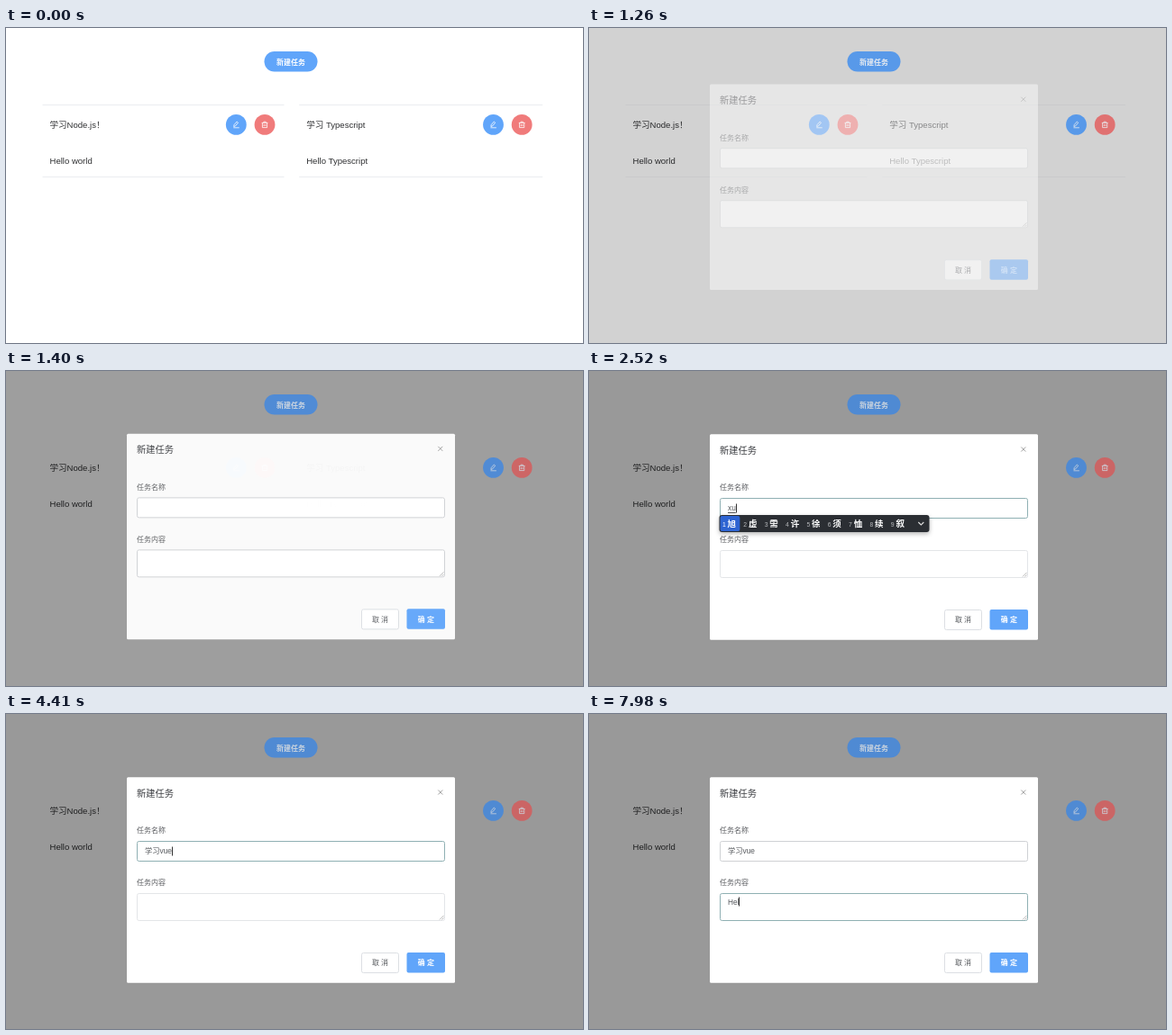
An HTML page with a canvas for the animation above (8000 ms loop, 640 by 350 pixels).

```html
<!DOCTYPE html>
<html lang="zh-CN">
<head>
<meta charset="utf-8">
<title>新建任务</title>
<style>
html, body { margin: 0; width: 100%; height: 100%; overflow: hidden; background: #fff; }
canvas { display: block; width: 640px; height: 350px; }
</style>
</head>
<body>
<canvas id="stage"></canvas>
<script>
const W = 640, H = 350, LOOP = 8000, STEP = 70;
const FONT = '"Liberation Sans", "Noto Sans CJK SC", "Noto Sans CJK", sans-serif';
const OPEN_AT = 1180, OPEN_TIME = 300;
const NAME_FOCUS = 1960, BODY_FOCUS = 5600;

const canvas = document.getElementById('stage');
const ctx = canvas.getContext('2d');
const ratio = window.devicePixelRatio || 1;
canvas.width = W * ratio;
canvas.height = H * ratio;

// Typed states: [start, text, composing, candidates]
const nameSteps = [
  [0, ''],
  [2380, 'x', true, '下 想 像 新 小 写 向 系 些'],
  [2450, 'xu', true, '旭 虚 需 许 徐 须 恤 续 叙'],
  [2660, 'xue', true, '学 雪 血 穴 靴 削 谑 踅 鳕'],
  [2940, 'xuex', true, '学习 学校 学些 学下 血型 雪橇'],
  [3080, 'xuexi', true, '学习 学系 血洗 血吸 雪西 学戏'],
  [3290, '学习'],
  [3990, '学习v'],
  [4130, '学习vu'],
  [4340, '学习vue']
];
const bodySteps = [[0, ''], [7280, 'H'], [7840, 'He'], [7910, 'Hel']];
const nameCaretOff = [[4830, 5320]];
const bodyCaretOff = [[6090, 6580], [7000, 7280], [7630, 7840]];

const at = (steps, t) => steps.filter(s => s[0] <= t).pop();
const inside = (spans, t) => spans.some(([a, b]) => t >= a && t < b);
const mix = (a, b, k) => 'rgb(' + a.map((v, i) => Math.round(v + (b[i] - v) * k)).join(',') + ')';

// CSS "ease" curve
function ease(x) {
  if (x <= 0) return 0;
  if (x >= 1) return 1;
  const curve = (u, a, b) => 3 * a * u * (1 - u) ** 2 + 3 * b * u * u * (1 - u) + u ** 3;
  let lo = 0, hi = 1;
  for (let i = 0; i < 24; i++) {
    const mid = (lo + hi) / 2;
    if (curve(mid, .25, .25) < x) lo = mid; else hi = mid;
  }
  return curve(lo, .1, 1);
}

function text(str, x, y, size, color, weight = 400, align = 'left') {
  ctx.font = `${weight} ${size}px ${FONT}`;
  ctx.textAlign = align;
  ctx.fillStyle = color;
  ctx.fillText(str, x, y);
}

function box(x, y, w, h, r, fill, stroke) {
  ctx.beginPath();
  ctx.roundRect(x, y, w, h, r);
  if (fill) { ctx.fillStyle = fill; ctx.fill(); }
  if (stroke) { ctx.strokeStyle = stroke; ctx.lineWidth = 1; ctx.stroke(); }
}

function path(points, color, width = .8) {
  ctx.beginPath();
  points.forEach(([x, y], i) => i ? ctx.lineTo(x, y) : ctx.moveTo(x, y));
  ctx.strokeStyle = color;
  ctx.lineWidth = width;
  ctx.stroke();
}

function roundButton(x, color, ink, icon) {
  ctx.save();
  ctx.translate(x, 107.4);
  ctx.beginPath();
  ctx.arc(0, 0, 11.4, 0, Math.PI * 2);
  ctx.fillStyle = color;
  ctx.fill();
  icon(ink);
  ctx.restore();
}

function pencil(ink) {
  path([[-2.6, 2.2], [-2.3, .2], [.8, -3.4], [2.2, -2.2], [-.8, 1.4], [-2.6, 2.2]], ink);
  path([[-3, 3.4], [3.4, 3.4]], ink);
}

function bin(ink) {
  path([[-3.4, -2], [3.4, -2]], ink);
  path([[-1.2, -2], [-1.2, -3.2], [1.2, -3.2], [1.2, -2]], ink);
  path([[-2.6, -2], [-2.6, 3.2], [2.6, 3.2], [2.6, -2]], ink);
  path([[-.9, -.4], [-.9, 1.7]], ink);
  path([[.9, -.4], [.9, 1.7]], ink);
}

function pageButtons(p) {
  const blue = mix([96, 165, 250], [79, 138, 211], p);
  const red = mix([240, 123, 123], [203, 101, 101], p);
  const ink = mix([255, 255, 255], [205, 213, 222], p);
  box(286.5, 26, 59, 22.5, 11.25, blue);
  text('新建任务', 316, 40.5, 8, ink, 700, 'center');
  for (const x of [255.3, 540.5]) {
    roundButton(x, blue, ink, pencil);
    roundButton(x + 31.7, red, ink, bin);
  }
}

function card(x, title, body, p) {
  const w = x < 300 ? 268 : 270;
  ctx.globalAlpha = 1 - p;
  ctx.fillStyle = '#ebedf0';
  ctx.fillRect(x, 85, w, 1);
  ctx.fillRect(x, 165, w, 1);
  ctx.globalAlpha = 1;
  text(title, x + 8, 111, 9.55, '#303133');
  text(body, x + 8, 151, 9.55, '#303133');
}

function caret(x, y) {
  ctx.fillStyle = '#333';
  ctx.fillRect(Math.round(x), y, 1, 10);
}

function candidates(list) {
  const words = list.split(' ');
  const pitch = words[0].length > 1 ? 33 : 23.35;
  ctx.save();
  ctx.shadowColor = 'rgba(0,0,0,.3)';
  ctx.shadowBlur = 5;
  ctx.shadowOffsetY = 2;
  box(144.5, 160, 233, 19, 3, '#2b2e33');
  ctx.restore();
  box(145.5, 161, pitch - 1.5, 17, 2, '#2e64d2');
  words.forEach((word, i) => {
    const x = 148 + i * pitch;
    text(i + 1, x, 172.5, 6.8, i ? '#b8babd' : '#fff');
    text(word, x + 5.6, 172.8, 9.5, '#fff', 700);
  });
  path([[365.3, 168], [368.3, 171], [371.3, 168]], '#ddd', 1.1);
}

function dialog(t, p) {
  const onName = t >= NAME_FOCUS && t < BODY_FOCUS;
  const onBody = t >= BODY_FOCUS;
  const weight = onName ? 400 : 500;
  const plain = '#cfd1d4', focus = '#8fb0b3';

  ctx.save();
  ctx.globalAlpha = p;
  ctx.translate(0, -14 * (1 - p));
  box(134, 70.3, 364, 228.5, 1.5, '#fff');
  text('新建任务', 145, 92, 10.25, '#3c3e42', weight);
  path([[479.3, 84.5], [484.3, 89.5]], '#888');
  path([[484.3, 84.5], [479.3, 89.5]], '#888');

  text('任务名称', 145, 132.3, 8, '#5c5e62', weight);
  text('任务内容', 145, 190.3, 8, '#5c5e62', weight);
  box(145.5, 141.5, 341, 22, 2, '#fff', onName ? focus : plain);
  box(145.5, 199.5, 341, 30, 2, '#fff', onBody ? focus : onName ? '#e3e5e8' : plain);
  path([[481, 228.5], [485.5, 224]], '#999', .7);
  path([[483.5, 228.5], [485.5, 226.5]], '#999', .7);

  box(394.5, 265.5, 41, 22, 2, '#fff', '#dcdfe3');
  text('取 消', 415, 279.3, 8, '#55585c', 500, 'center');
  box(444.5, 265, 42.5, 22.5, 2, '#60a5fa');
  text('确 定', 465.8, 279.3, 8, '#fff', 700, 'center');

  const [, name, composing, list] = at(nameSteps, t);
  text(name, 154, 155.3, 8.3, '#55585c');
  const nameWidth = ctx.measureText(name).width;
  if (composing) path([[154, 157.5], [154 + nameWidth, 157.5]], '#555', 1);
  if (onName && !inside(nameCaretOff, t)) caret(154 + nameWidth, 147.5);

  const body = at(bodySteps, t)[1];
  text(body, 154, 211.7, 8.3, '#55585c');
  if (onBody && !inside(bodyCaretOff, t)) caret(154 + ctx.measureText(body).width, 203.5);

  if (list) candidates(list);
  ctx.restore();
}

function draw(now) {
  const t = Math.floor((now % LOOP) / STEP) * STEP;
  const p = ease((t - OPEN_AT) / OPEN_TIME);
  ctx.setTransform(ratio, 0, 0, ratio, 0, 0);
  ctx.fillStyle = '#fff';
  ctx.fillRect(0, 0, W, H);
  card(40.5, '学习Node.js！', 'Hello world', p);
  card(325.2, '学习 Typescript', 'Hello Typescript', p);
  ctx.fillStyle = `rgba(0,0,0,${.4 * p})`;
  ctx.fillRect(0, 0, W, H);
  pageButtons(p);
  if (p > 0) dialog(t, p);
}

let start;
function tick(now) {
  start ??= now;
  draw(now - start);
  requestAnimationFrame(tick);
}
draw(0);
requestAnimationFrame(tick);
</script>
</body>
</html>
```
